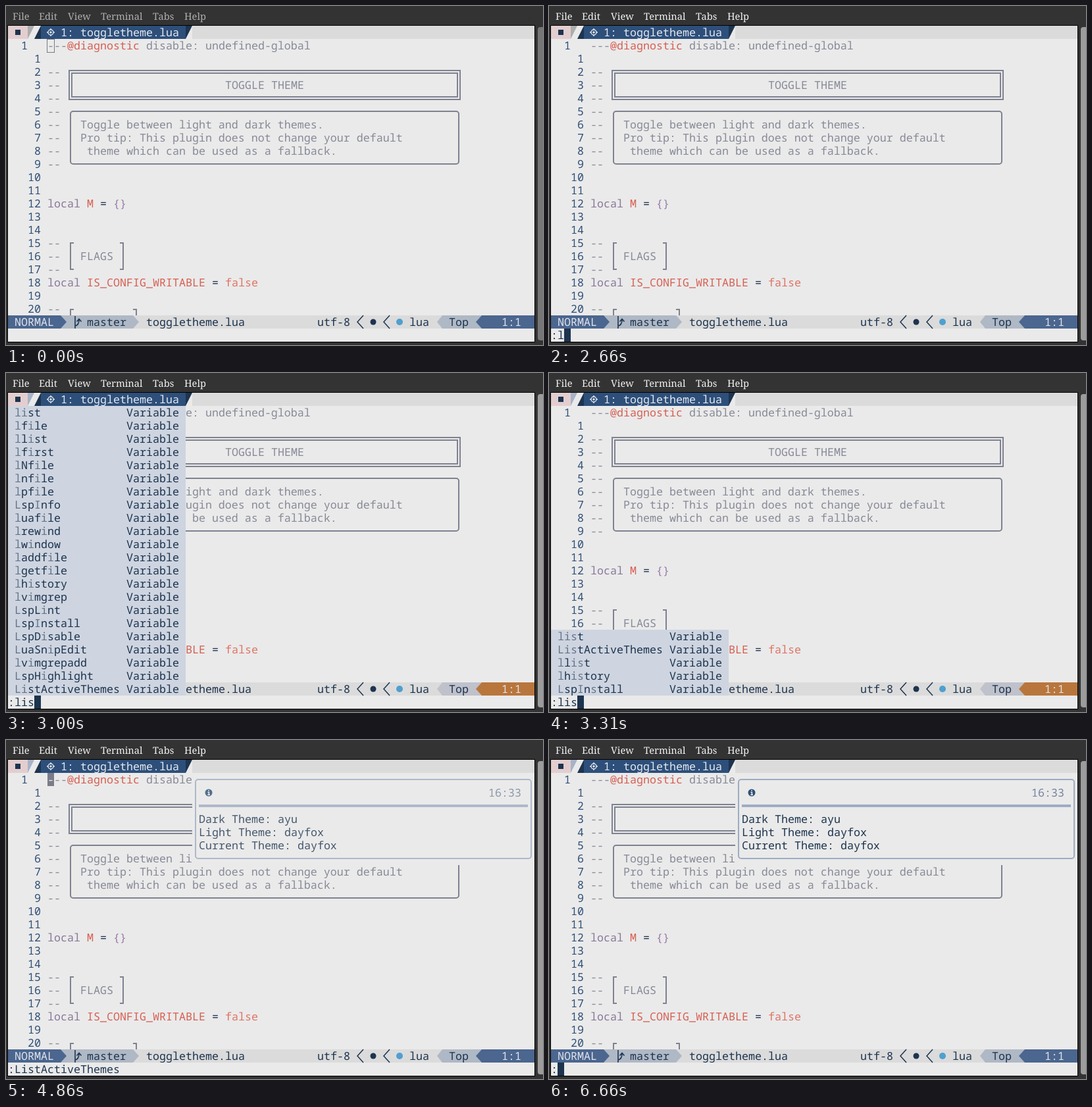
Animation of 816 by 515 pixels, one loop 8000 ms. Source, as an HTML page:

```html
<!DOCTYPE html>
<html lang="en">
<head>
<meta charset="utf-8">
<title>Editor session</title>
<style>
  html, body { margin: 0; width: 100%; height: 100%; overflow: hidden; background: #333; }
  svg { display: block; width: 816px; height: 515px; }
  text { white-space: pre; text-rendering: geometricPrecision; }
  .term text { font: 300 16.667px "Noto Sans Mono", monospace; }
  #menu text { font: 14.6px "Noto Serif", serif; }
</style>
</head>
<body>
<svg viewBox="0 0 816 515">
  <g id="menu"></g>
  <rect id="scroll" x="808" y="32" width="12" height="476" rx="4"/>
  <rect x="2" y="29" width="802" height="482" fill="#000"/>
  <rect x="3" y="30" width="800" height="480" fill="#eaeaea"/>
  <g class="term" id="buffer"></g>
  <g class="term" id="live"></g>
</svg>
<script>
const LOOP = 8000;
const C = {
  bg: '#eaeaea', bar: '#dbdbdb', navy: '#1d344f', tab: '#2d4f7a', num: '#2f5077',
  comment: '#878a97', line: '#7f8290', red: '#d75f52', pale: '#df7466',
  key: '#8a7898', brace: '#9a78a8', menu: '#ced5e0', pick: '#b1c1d9',
  thumb: '#b9bcc7', match: '#65758b'
};
const $ = id => document.getElementById(id);

// Terminal grid: cells of 10 x 20 px with the corner at (3, 30)
const X = col => 3 + col * 10;
const Y = row => 30 + row * 20;
const esc = s => s.replace(/&/g, '&amp;').replace(/</g, '&lt;');
const text = (col, row, s, fill) =>
  `<text x="${X(col)}" y="${Y(row) + 16}" fill="${fill}">${esc(s)}</text>`;
const rect = (x, y, w, h, fill) =>
  `<rect x="${x}" y="${y}" width="${w}" height="${h}" fill="${fill}"/>`;
const cells = (col, row, w, h, fill) => rect(X(col), Y(row), w * 10, h * 20, fill);
const poly = (points, fill) => `<polygon points="${points}" fill="${fill}"/>`;
const dot = (x, y, r, fill) => `<circle cx="${x}" cy="${y}" r="${r}" fill="${fill}"/>`;
const stroke = (d, color, w = 2) =>
  `<path d="${d}" fill="none" stroke="${color}" stroke-width="${w}"/>`;
const frame = (x1, y1, x2, y2, r, color) =>
  `<rect x="${x1}" y="${y1}" width="${x2 - x1}" height="${y2 - y1}" rx="${r}" fill="none" stroke="${color}" stroke-width="2"/>`;

function buffer() {
  let s = text(6, 1, '---', C.comment) + text(9, 1, '@diagnostic', C.red) +
    text(20, 1, ' disable: undefined-global', C.comment) + text(2, 1, '1', C.num);
  for (let n = 1; n <= 20; n++) {
    s += text(3, n + 1, String(n).padStart(2), C.num);
    if (n > 1 && n < 10 || n > 14 && n < 18 || n === 20) s += text(6, n + 1, '--', C.comment);
  }
  s += frame(96, 98, 690, 142, 0, C.line) + frame(100, 102, 686, 138, 0, C.line) +
    text(33, 4, 'TOGGLE THEME', C.comment) +
    frame(98, 160, 688, 240, 4, C.line) +
    text(11, 7, 'Toggle between light and dark themes.', C.comment) +
    text(11, 8, 'Pro tip: This plugin does not change your default', C.comment) +
    text(12, 9, 'theme which can be used as a fallback.', C.comment);
  s += text(6, 13, 'local', C.key) + text(12, 13, 'M', C.red) +
    text(14, 13, '=', C.navy) + text(16, 13, '{}', C.brace);
  s += stroke('M103 360H98V400H103M173 360H178V400H173M103 461H98V470M193 461H198V470', C.line) +
    text(11, 17, 'FLAGS', C.comment);
  return s + text(6, 19, 'local', C.key) + text(12, 19, 'IS_CONFIG_WRITABLE', C.red) +
    text(31, 19, '=', C.navy) + text(33, 19, 'false', C.pale);
}

function tabline(slant) {
  return cells(0, 0, 80, 1, C.bar) + cells(0, 0, 3, 1, '#e3cecf') + cells(3, 0, 25, 1, C.bg) +
    rect(14, 36, 8, 8, C.navy) +
    poly('33,30 43,30 33,50', slant) + poly('53,30 53,50 43,50', C.navy) +
    cells(5, 0, 22, 1, C.tab) + poly('273,30 283,30 273,50', C.navy) +
    `<circle cx="68" cy="40" r="4" fill="none" stroke="#e4e8ee" stroke-width="1.4"/>` +
    dot(68, 40, 1.7, '#e4e8ee') +
    stroke('M68 34V36M68 44V46M62 40H64M72 40H74', '#e4e8ee', 1.4) +
    text(8, 0, '1: toggletheme.lua', '#e4e8ee');
}

function statusline(command) {
  const main = command ? '#b9763c' : '#4b668f';
  const side = command ? '#bfc1cb' : '#afb8c5';
  const mode = command ? 'COMMAND' : 'NORMAL';
  const end = X(mode.length + 2), dx = end - 83;
  return cells(0, 22, 80, 1, C.bar) +
    rect(end, 470, 110, 20, side) +
    poly(`${end + 110},470 ${end + 119},480 ${end + 110},490`, side) +
    rect(3, 470, end - 3, 20, main) + poly(`${end},470 ${end + 9},480 ${end},490`, main) +
    text(1, 22, mode, '#dfe3ea') +
    `<g transform="translate(${dx})">` +
    stroke('M105 471V490M105 486Q111 485 111 476M107.5 479.5L111 475.5L114.5 479.5', C.navy, 1.6) +
    text(12, 22, 'master', C.navy) + text(21, 22, 'toggletheme.lua', C.navy) + '</g>' +
    text(47, 22, 'utf-8', C.navy) +
    stroke('M543 470L534 480L543 490M583 470L574 480L583 490', C.navy, 1.5) +
    dot(558, 480, 4.5, C.navy) + dot(598, 480, 5, '#4f9fd0') +
    text(61, 22, 'lua', C.navy) +
    poly('663,470 655,480 663,490', side) + rect(663, 470, 60, 20, side) +
    text(67, 22, 'Top', C.navy) +
    poly('723,470 714,480 723,490', main) + rect(723, 470, 80, 20, main) +
    text(75, 22, '1:1', '#dfe3ea');
}

// Completion item with its fuzzy-matched letters dimmed
function item(row, word, query) {
  let k = 0;
  const spans = [...word].map(ch => {
    const hit = k < query.length && ch.toLowerCase() === query[k];
    if (hit) k++;
    return hit ? `<tspan fill="${C.match}">${ch}</tspan>` : ch;
  }).join('');
  return `<text x="13" y="${Y(row) + 16}" fill="${C.navy}">${spans}</text>` +
    text(18, row, 'Variable', C.navy);
}

const WORDS = {
  l: 'll ls lcd ldo let lua last left lfdo list lmap ltag lNext later lexpr lfile lgrep llast llist lmake lnext lopen luado',
  li: 'list lfile llist lfirst lNfile lnfile lpfile LspInfo luafile lrewind lwindow laddfile lgetfile lhistory lvimgrep LspLint LspInstall LspDisable LuaSnipEdit lvimgrepadd LspHighlight ListActiveThemes',
  lis: 'list ListActiveThemes llist lhistory LspInstall'
};

function popup(query, pick) {
  const words = WORDS[query].split(' ');
  const top = 23 - words.length;
  const long = words.length > 22;
  let s = cells(0, top, long ? 28 : 27, words.length, C.menu);
  if (long) s += cells(27, 0, 1, 7, C.thumb);
  if (pick >= 0) s += cells(0, top + pick, 27, 1, C.pick);
  return s + words.map((w, i) => item(top + i, w, query)).join('');
}

function notice(alpha) {
  const border = '#9eacc3';
  return cells(28, 1, 52, 7, C.bg) + `<g opacity="${alpha}">` +
    frame(288, 60, 798, 180, 4, border) + rect(293, 98, 500, 4, border) +
    dot(308, 80, 5.5, C.num) +
    stroke('M308 76V77.8M306.5 79.5H308.4V83.3M306.3 83.3H310', C.bg, 1.5) +
    text(73, 2, '16:33', '#75849b') +
    text(29, 4, 'Dark Theme: ayu', C.navy) +
    text(29, 5, 'Light Theme: dayfox', C.navy) +
    text(29, 6, 'Current Theme: dayfox', C.navy) + '</g>';
}

function cursor(kind) {
  if (kind === 'hollow')
    return '<rect x="62.5" y="50.5" width="11" height="20" fill="none" stroke="#777a84"/>';
  return kind === 'block' ? cells(6, 1, 1, 1, '#7a7d89') + text(6, 1, '-', C.bg) : '';
}

// Each step changes only the listed parts of the screen
const STEPS = [
  [0, { cur: 'hollow', cmd: '', command: false, query: '', pick: -1, note: -1, slant: '#adadad' }],
  [450, { cur: 'block' }],
  [2660, { cur: 'cmd', cmd: ':l' }],
  [2790, { cmd: ':li', command: true, query: 'l', slant: '#a6b3c9' }],
  [2970, { cmd: ':lis' }],
  [3000, { query: 'li' }],
  [3310, { query: 'lis' }],
  [3970, { cmd: ':list', pick: 0 }],
  [4410, { cmd: ':ListActiveThemes', pick: 1 }],
  [4590, { query: '' }],
  [4620, { cur: 'block', command: false, note: 0 }],
  [4860, { note: .8 }],
  [5100, { note: .88 }],
  [5410, { note: .95 }],
  [5660, { note: .98 }],
  [5860, { note: 1 }],
  [6620, { cur: 'cmd', cmd: ':' }]
];

function render(s) {
  $('live').innerHTML = cursor(s.cur) + tabline(s.slant) + statusline(s.command) +
    text(0, 23, s.cmd, C.navy) +
    (s.cur === 'cmd' ? cells(s.cmd.length, 23, 1, 1, C.navy) : '') +
    (s.query ? popup(s.query, s.pick) : '') +
    (s.note >= 0 ? notice(s.note) : '');
}

// The window gains focus in six steps
function focus(level) {
  const grey = (a, b) => {
    const v = Math.round(a + (b - a) * level / 6);
    return `rgb(${v},${v},${v})`;
  };
  $('menu').setAttribute('fill', grey(176, 244));
  $('scroll').setAttribute('fill', grey(118, 156));
}

$('menu').innerHTML = [['File', 10], ['Edit', 50], ['View', 94], ['Terminal', 144], ['Tabs', 223], ['Help', 271]]
  .map(([s, x]) => `<text x="${x}" y="21">${s}</text>`).join('');
$('buffer').innerHTML = buffer();

let shown = -1, lit = -1;
function tick() {
  const t = (performance.now() - start) % LOOP;
  const count = STEPS.filter(([at]) => at <= t).length;
  const level = t < 450 ? 0 : Math.min(6, 1 + Math.floor((t - 450) / 42));
  if (count !== shown) {
    shown = count;
    render(Object.assign({}, ...STEPS.slice(0, count).map(([, change]) => change)));
  }
  if (level !== lit) focus(lit = level);
  requestAnimationFrame(tick);
}
const start = performance.now();
tick();
</script>
</body>
</html>
```
